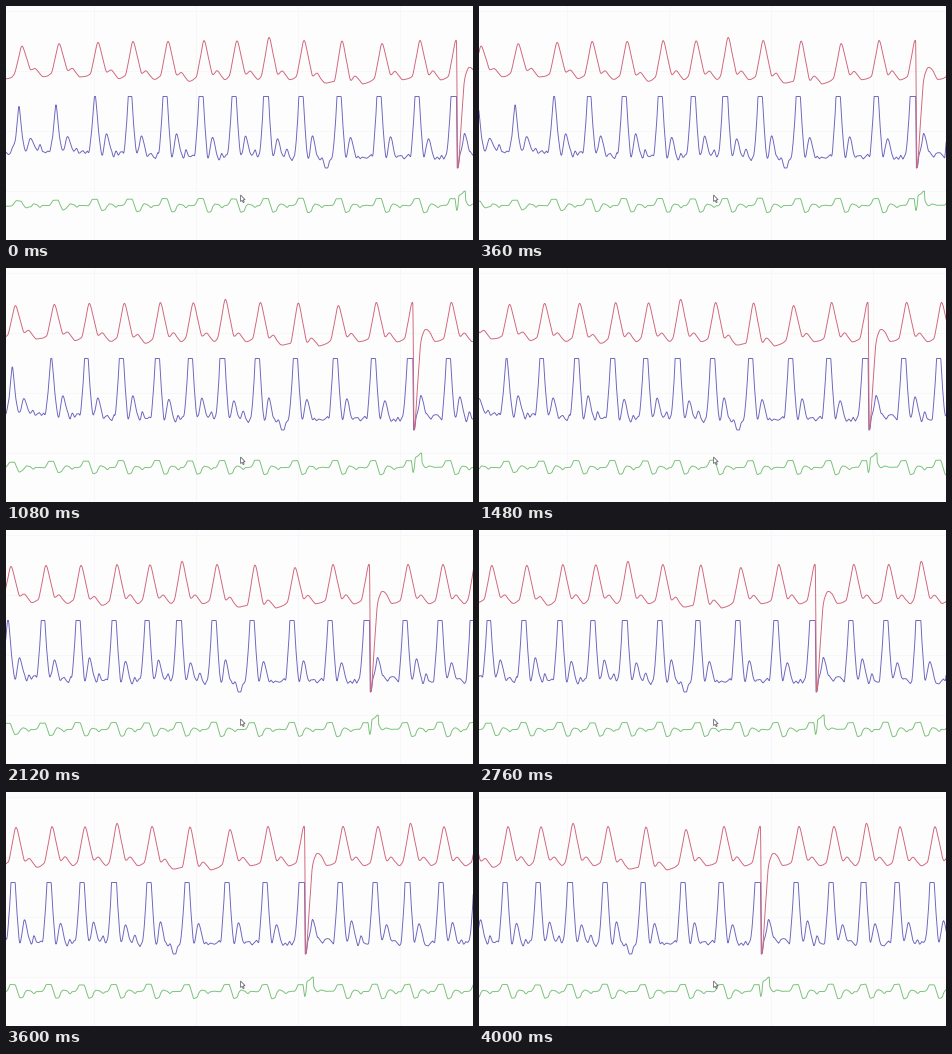
Recreate the animation shown at these times as a matplotlib script. Size 467 px wide and 234 px high, loop 4040 ms.

```python
import numpy as np
import matplotlib.pyplot as plt
from matplotlib.animation import FuncAnimation
from matplotlib.patches import Polygon

W, H, DPI = 467, 234, 100
FRAMES, STEP = 101, 40
PX = 72 / DPI

BEATS = [16, 53, 92, 127, 162, 198, 231, 263, 298, 336, 376, 414,
         450, 489, 524, 556.5, 590, 625]
SPIKE = 450
# Scroll distance over time
TIMES = [0, 720, 1480, 2120, 2760, 3600, 4000]
SHIFTS = [0, 27.7, 61.4, 87, 114.2, 152, 169]


def smooth(points, x):
    """Shape-preserving cubic through the points."""
    px, py = np.array(sorted(points), float).T
    h = np.diff(px)
    d = np.diff(py) / h
    m = np.zeros_like(px)
    same = d[:-1] * d[1:] > 0
    m[1:-1][same] = (2 * d[:-1] * d[1:])[same] / (d[:-1] + d[1:])[same]
    i = np.clip(np.searchsorted(px, x) - 1, 0, len(h) - 1)
    t = (x - px[i]) / h[i]
    return (py[i] * (1 + 2 * t) * (1 - t) ** 2 + h[i] * m[i] * t * (1 - t) ** 2
            + py[i + 1] * t * t * (3 - 2 * t) + h[i] * m[i + 1] * t * t * (t - 1))


def wobble(x, gap, size, seed):
    rng = np.random.default_rng(seed)
    knots = np.arange(0, x[-1] + gap, gap)
    return np.interp(x, knots, rng.uniform(-size, size, len(knots)))


def bell(x, mid, width):
    return np.exp(-((x - mid) / width) ** 2)


def strong(x):
    """The two beats that reach higher than the rest."""
    return bell(x, 263, 9) + bell(x, 556, 9)


def early(x):
    return np.exp(-x / 70)


def trace(x, beat, spike, rest):
    """Join one pulse per beat, with the spike in place of one tail."""
    pts = [(-5, rest), (2, rest), (670, rest)]
    for p in BEATS:
        rise, fall = beat(p)
        tail = spike if p == SPIKE else fall
        pts += rise + [(p + dx, y) for dx, y in tail]
    return smooth(pts, x)


def red_trace(x):
    def base(u):
        return 73 - 3 * bell(u, 50, 60) + 6 * bell(u, 340, 28) + 1.5 * bell(u, 180, 14)

    def beat(p):
        top = 34 + 7 * early(p) + 3 * bell(p, 376, 25) - 3 * strong(p)
        foot, low = base(p - 8) - 3, base(p + 21)
        dip = base(p + 9) - 5 - 3 * early(p)
        rise = [(p - 8, foot), (p - 4, (foot + top) / 2), (p, top)]
        return rise, [(4.5, (top + dip) / 2), (9, dip), (13, base(p + 13) - 8.5),
                      (17, low - 4), (21, low)]

    spike = [(.4, 34), (1.8, 161), (5, 120), (8.2, 76), (10, 67), (13, 61),
             (17, 63), (23, 73)]
    return trace(x, beat, spike, 72) + wobble(x, 3, .4, 4)


def blue_trace(x):
    rng = np.random.default_rng(5)

    def base(u):
        return 151 - 6 * bell(u, 40, 80) + 3 * bell(u, 310, 20)

    def beat(p):
        c = p - 3
        top = 69 + 31 * np.exp(-(p / 110) ** 4) - 8 * strong(p)
        waist, low = (top + 150) / 2 + 8, base(p + 17)
        rise = [(c - 6.8, low - 2), (c - 3.6, waist), (c - 1.7, top + 14), (c, top)]
        return rise, [(-1.3, top + 14), (.8, waist), (4, low - 1),
                      (8.5, 130 + rng.uniform(-3, 3)), (13, low - 4),
                      (15, low), (18, low - rng.uniform(0, 9)), (21, low)]

    spike = [(.2, 69), (1.3, 161), (2.2, 161), (4, 149), (6.5, 138), (8.5, 127),
             (11, 134), (14, 147), (22, 149)]
    y = trace(x, beat, spike, 148)
    y += wobble(x, 2.2, 3, 11) * np.clip((y - 135) / 12, 0, 1)
    y += 8 * bell(x, 321, 3)
    return np.clip(y, 90, 161.5)


def green_trace(x):
    def beat(p):
        top, dip = 192 + 3 * early(p), 206 - 6 * early(p)
        rise = [(p - 10, 199), (p - 8, 197), (p - 5.5, top), (p - 1.2, top)]
        return rise, [(1.5, 199), (4, dip), (7, dip - 1), (9, 200),
                      (11.5, 197.5), (15, 198.5), (18, 201), (20.5, 199)]

    spike = [(.8, 204), (2, 199), (3, 189), (6, 187), (8, 184.8), (9.2, 184.3),
             (9.8, 194), (13.5, 199), (16.5, 197.5), (22.5, 199)]
    return trace(x, beat, spike, 199.5) + wobble(x, 3, .4, 7)


fig = plt.figure(figsize=(W / DPI, H / DPI), dpi=DPI, facecolor="#fefdfe")
ax = fig.add_axes([0, 0, 1, 1])
ax.set(xlim=(0, W), ylim=(H, 0))
ax.axis("off")

for k in range(4):
    ax.axvline(87.5 + 102 * k, color="#f7f6f9", lw=PX, zorder=0)
    ax.axhline(4.5 + 60 * k, color="#f7f6f9", lw=PX, zorder=0)

world = np.arange(0, 645, .25)
traces = [
    ax.plot(world, shape(world) + .5, color=color, lw=.95 * PX)[0]
    for shape, color in ((blue_trace, "#6b66bd"), (red_trace, "#d0667a"),
                         (green_trace, "#78c278"))
]

arrow = np.array([(0, 0), (0, 6.6), (1.5, 5.3), (2.6, 7.6), (3.6, 7.1),
                  (2.6, 4.9), (4.5, 4.7)])
ax.add_patch(Polygon(arrow + (234.6, 189), closed=True, fc="white", ec="#66666e",
                     lw=.8 * PX, zorder=5))


def draw(i):
    shift = np.interp(i * STEP, TIMES, SHIFTS)
    for line in traces:
        line.set_xdata(world - shift)
    return traces


anim = FuncAnimation(fig, draw, frames=FRAMES, interval=STEP, repeat=True,
                     repeat_delay=0, blit=False)
plt.show()
```
